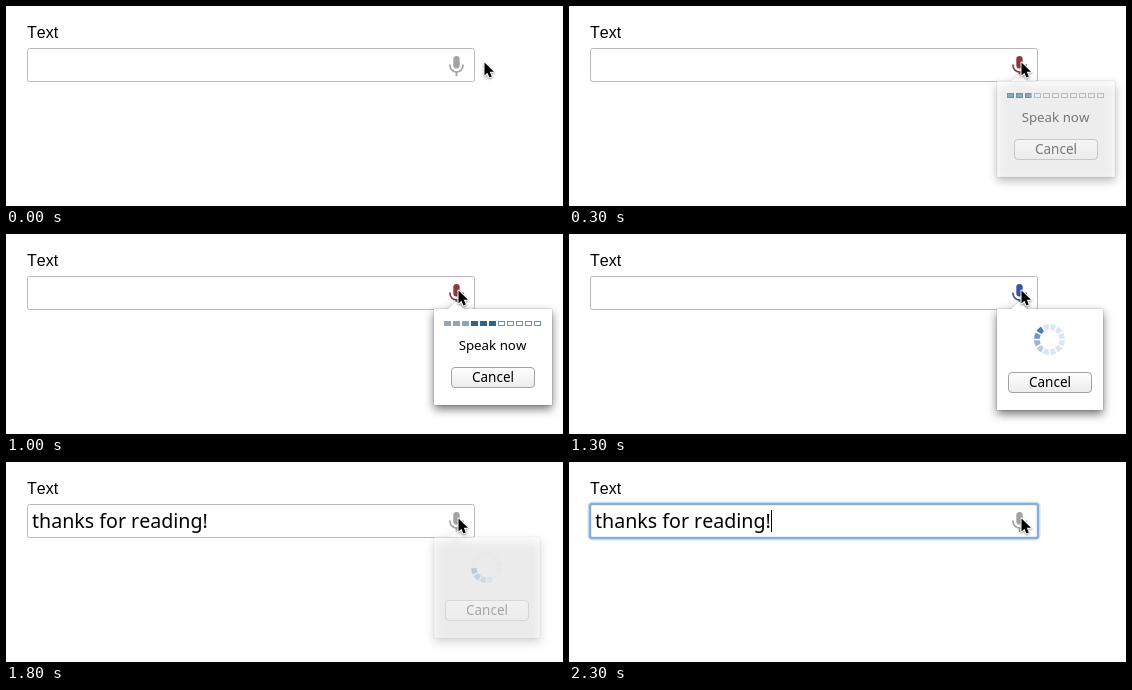
Write an HTML page with a canvas that moves like this. It is 557 px wide and 200 px high and loops after 2.4 s.

```html
<!DOCTYPE html>
<html lang="en">
<head>
<meta charset="utf-8">
<title>Speech input</title>
<style>
html, body { margin: 0; width: 100%; height: 100%; overflow: hidden; background: #fff; }
canvas { display: block; }
</style>
</head>
<body>
<canvas id="stage" width="557" height="200"></canvas>
<script>
const ctx = document.getElementById('stage').getContext('2d');
const LOOP = 2400, STEP = 100;
const UI_FONT = '"Noto Sans", "Open Sans", sans-serif';
const LABEL_FONT = '"Liberation Sans", Arial, sans-serif';

// Right edges of the meter fills, one value per step from 400 ms on.
const VOLUME = [462, 481, 498, 506, 514, 501, 491, 485, 480];
const NOISE = [438, 445, 451, 455, 458, 461, 464, 465, 466];

function text(str, x, y, font, color = '#000', align = 'left') {
  ctx.font = font;
  ctx.fillStyle = color;
  ctx.textAlign = align;
  ctx.fillText(str, x, y);
}

function roundRect(x, y, w, h, r) {
  ctx.beginPath();
  ctx.roundRect(x, y, w, h, r);
}

function polygon(points) {
  ctx.beginPath();
  points.forEach(([x, y]) => ctx.lineTo(x, y));
  ctx.closePath();
}

function stroke(color, width = 1) {
  ctx.strokeStyle = color;
  ctx.lineWidth = width;
  ctx.stroke();
}

function fill(color) {
  ctx.fillStyle = color;
  ctx.fill();
}

function drawField(focused) {
  if (focused) {
    roundRect(20.5, 41.5, 449, 35, 3);
    stroke('rgba(110,160,220,.35)', 4);
    roundRect(21, 42, 448, 34, 2);
    stroke('#86abd8', 2);
  } else {
    roundRect(21.5, 42.5, 447, 33, 2);
    stroke('#b9b9b9');
  }
}

function drawMic(color) {
  roundRect(447.3, 50, 6.4, 12.5, 3.2);
  fill(color);
  ctx.beginPath();
  ctx.moveTo(444, 58.5);
  ctx.arc(450.5, 59.5, 6.5, Math.PI, 0, true);
  ctx.lineTo(457, 58.5);
  stroke(color, 1.7);
  ctx.fillStyle = color;
  ctx.fillRect(449.5, 66, 2, 4);
}

function drawCursor(x, y) {
  ctx.save();
  ctx.translate(x, y);
  polygon([[0.5, 0.5], [0.5, 13.6], [3.4, 10.8], [5.5, 15.4], [7.8, 14.4], [5.8, 9.8], [10, 9.8]]);
  ctx.lineJoin = 'round';
  ctx.shadowColor = 'rgba(0,0,0,.4)';
  ctx.shadowBlur = 2;
  ctx.shadowOffsetY = 1;
  stroke('#fff', 2);
  ctx.shadowColor = 'transparent';
  fill('#000');
  ctx.restore();
}

function drawBubble(right, bottom) {
  const left = 428, top = 75;
  polygon([
    [left, top], [442, top], [450, 67.5], [458, top],
    [right, top], [right, bottom], [left, bottom]
  ]);
  ctx.save();
  ctx.shadowColor = 'rgba(0,0,0,.55)';
  ctx.shadowBlur = 10;
  ctx.shadowOffsetY = 4;
  fill('#fff');
  ctx.restore();
  stroke('rgba(0,0,0,.16)');
  fill('#fff');
}

function drawButton(x, y) {
  const shade = ctx.createLinearGradient(0, y, 0, y + 20);
  shade.addColorStop(0, '#fff');
  shade.addColorStop(0.5, '#f6f6f6');
  shade.addColorStop(1, '#ececec');
  roundRect(x + 0.5, y + 0.5, 83, 20, 3.5);
  fill(shade);
  stroke('#a2a2a2');
  text('Cancel', x + 42, y + 15, '13.5px ' + UI_FONT, '#000', 'center');
}

function drawMeter(noise, volume) {
  const span = (x, from, to, color) => {
    const a = Math.max(x, from), b = Math.min(x + 8, to);
    ctx.fillStyle = color;
    if (b > a) ctx.fillRect(a, 87, b - a, 5);
  };
  for (let i = 0; i < 11; i++) {
    const x = 438 + i * 9;
    ctx.strokeStyle = '#6a91ad';
    ctx.lineWidth = 1;
    ctx.strokeRect(x + 0.5, 87.5, 6, 4);
    ctx.save();
    ctx.beginPath();
    ctx.rect(x, 87, 7, 5);
    ctx.clip();
    span(x, 438, noise, '#8fa6b8');
    span(x, noise, volume, '#2f6389');
    ctx.restore();
  }
}

function drawSpinner(head) {
  const tail = ['#4f7ab5', '#7196c6', '#98b3d6', '#bccde3'];
  const arc = Math.PI / 6, gap = 0.05;
  for (let i = 0; i < 12; i++) {
    const a = (head - i) * arc;
    ctx.beginPath();
    ctx.arc(480.5, 105.5, 15.5, a + gap, a + arc - gap);
    ctx.arc(480.5, 105.5, 9.8, a + arc - gap * 1.5, a + gap * 1.5, true);
    ctx.closePath();
    fill(tail[i] || '#dde5f0');
  }
}

function drawListening(i) {
  drawBubble(546, 171);
  drawMeter(NOISE[i], VOLUME[i]);
  text('Speak now', 486.5, 116, '13.3px ' + UI_FONT, '#000', 'center');
  drawButton(445, 133);
}

function drawWaiting(step) {
  drawBubble(534, 176);
  drawSpinner(-1 + (step - 15) * 2);
  drawButton(439, 138);
}

function drawCaret(x) {
  ctx.fillStyle = '#000';
  ctx.fillRect(x, 48, 1, 22);
}

function draw(step) {
  const listening = step >= 3 && step < 13;
  const waiting = step >= 13 && step < 18;

  ctx.fillStyle = '#fff';
  ctx.fillRect(0, 0, 557, 200);
  ctx.fontKerning = 'none';
  text('Text', 21, 32, '16px ' + LABEL_FONT);
  drawField(step === 2 || step >= 19);

  if (step === 19 || step === 20) {
    ctx.fillStyle = '#b4d5fe';
    ctx.fillRect(27, 48, 176, 22);
  }
  if (step >= 18) text('thanks for reading!', 26, 66, '19.63px ' + UI_FONT);
  if (step === 2) drawCaret(26);
  if (step >= 23) drawCaret(202);

  drawMic(listening ? '#8b3a40' : waiting ? '#3f53a3' : '#a3a3a3');

  ctx.globalAlpha = step === 3 ? 0.5 : step === 18 ? 0.3 : 1;
  if (listening) drawListening(Math.max(0, step - 4));
  else if (waiting || step === 18) drawWaiting(step);
  ctx.globalAlpha = 1;

  drawCursor([478, 462][step] || 452, 56);
}

function tick() {
  draw(Math.floor((performance.now() % LOOP) / STEP));
  requestAnimationFrame(tick);
}
tick();
</script>
</body>
</html>
```
